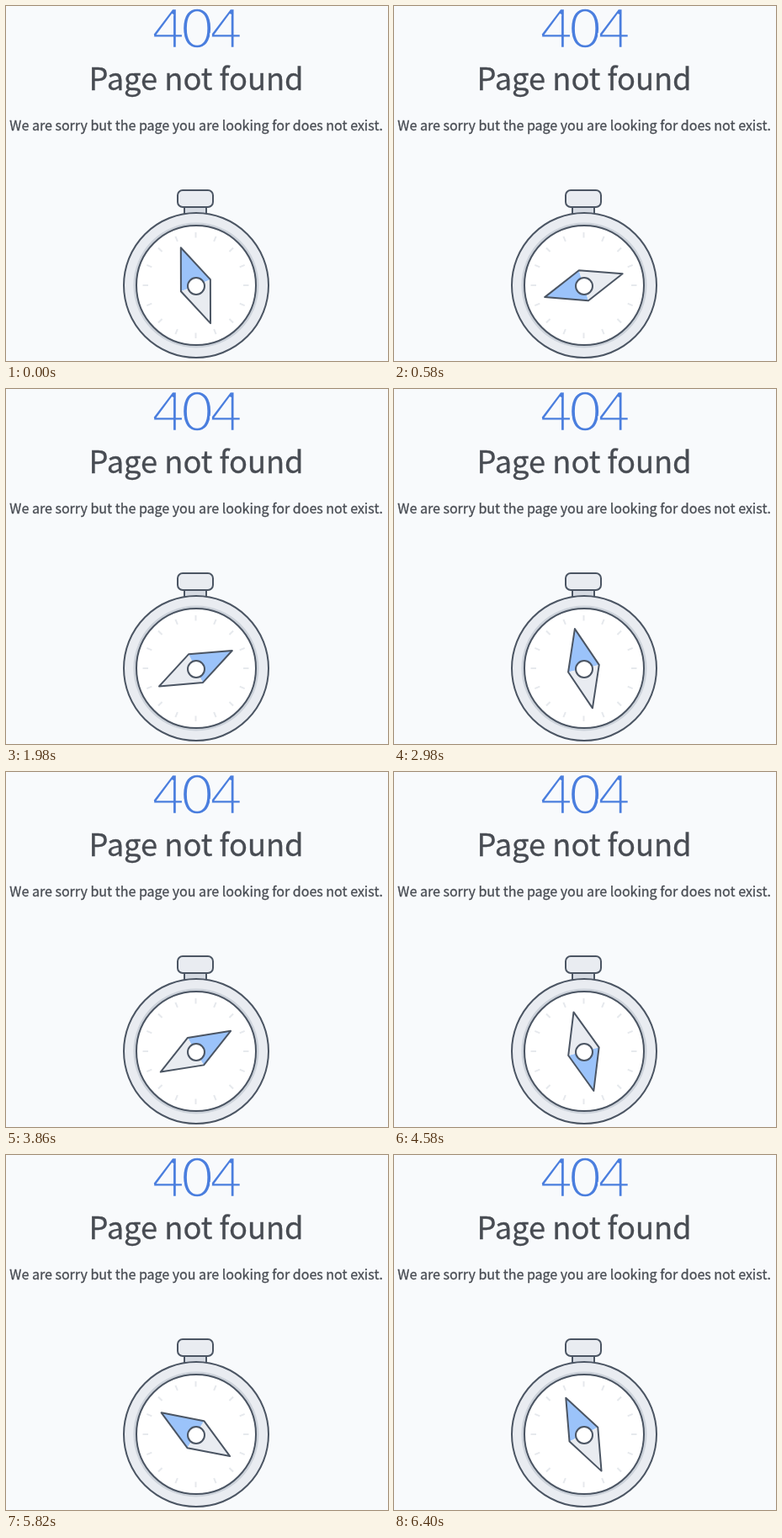
Write an HTML page that moves like this. It is 454x422 px and loops after 6420 ms.

```html
<!DOCTYPE html>
<html lang="en">
<head>
<meta charset="utf-8">
<title>Page not found</title>
<style>
  html, body { margin: 0; width: 100%; height: 100%; overflow: hidden; background: #f8fafc; }
  svg { display: block; width: 454px; height: 422px; }
  text {
    font-family: "Noto Sans CJK JP", "Noto Sans CJK SC", "Noto Sans CJK", "Noto Sans", sans-serif;
    font-weight: 400;
    text-anchor: middle;
    fill: #484c53;
    stroke: #484c53;
    stroke-width: .3;
  }
  /* A page-coloured outline slims the numerals to a hairline weight. */
  .code {
    font-family: Lato, "Open Sans", sans-serif;
    font-size: 66px; letter-spacing: -3.9px;
    fill: #4a7ede; stroke: #f8fafc; stroke-width: 2.4;
  }
  .title { font-size: 36.3px; }
  .note { font-size: 16.03px; }
  .line { stroke: #4b5563; stroke-width: 2; stroke-linejoin: round; }
  .ticks { stroke: #e6e9ed; stroke-width: 2; }
</style>
</head>
<body>
<svg viewBox="0 0 454 422">
  <rect width="454" height="422" fill="#f8fafc"/>
  <text class="code" x="225.2" y="50.3">404</text>
  <text class="title" x="226" y="99.7">Page not found</text>
  <text class="note" x="226.2" y="148">We are sorry but the page you are looking for does not exist.</text>

  <rect class="line" x="212" y="236" width="26" height="14" fill="#d5dae2"/>
  <rect class="line" x="204" y="219" width="42" height="20" rx="6" fill="#e9ecf1"/>
  <circle class="line" cx="226" cy="332" r="86" fill="#e9ecf1"/>
  <circle cx="226" cy="332" r="74.5" fill="#cdd3db"/>
  <circle class="line" cx="226" cy="332" r="71" fill="#fff"/>
  <g class="ticks" id="ticks" transform="translate(225.5 332)"></g>

  <g transform="translate(225.4 332.2)">
    <g id="needle">
      <path d="M-17.5 7V-45L17.5 -7Z" fill="#9bc3fa"/>
      <path d="M-17.5 7L17.5 -7V45Z" fill="#e9ecf1"/>
      <path class="line" d="M-17.5 7V-45L17.5 -7V45Z" fill="none"/>
    </g>
  </g>
  <circle class="line" cx="226" cy="333" r="10" fill="#fff"/>
</svg>
<script>
  const LOOP = 6420;
  const SWING = 3310;
  const needle = document.getElementById('needle');
  const ticks = document.getElementById('ticks');

  for (let i = 0; i < 16; i++) {
    const mark = document.createElementNS('http://www.w3.org/2000/svg', 'path');
    mark.setAttribute('d', 'M0 -63V-56.5');
    mark.setAttribute('transform', `rotate(${i * 22.5})`);
    ticks.append(mark);
  }

  function bezierEase(x1, y1, x2, y2) {
    const at = (s, a, b) => 3 * (1 - s) ** 2 * s * a + 3 * (1 - s) * s * s * b + s ** 3;
    return x => {
      let low = 0, high = 1;
      for (let i = 0; i < 24; i++) {
        const mid = (low + high) / 2;
        if (at(mid, x1, x2) < x) low = mid; else high = mid;
      }
      return at(low, y1, y2);
    };
  }

  const ease = bezierEase(.2, .24, .61, .96);

  // One full turn to the left, then one back to the right.
  function needleAngle(t) {
    return t < SWING
      ? -360 * ease(t / SWING)
      : -360 + 360 * ease((t - SWING) / SWING);
  }

  function render(t) {
    needle.setAttribute('transform', `rotate(${needleAngle(t).toFixed(3)})`);
  }

  const start = performance.now();
  function animate() {
    render((performance.now() - start) % LOOP);
    requestAnimationFrame(animate);
  }
  animate();
</script>
</body>
</html>
```
